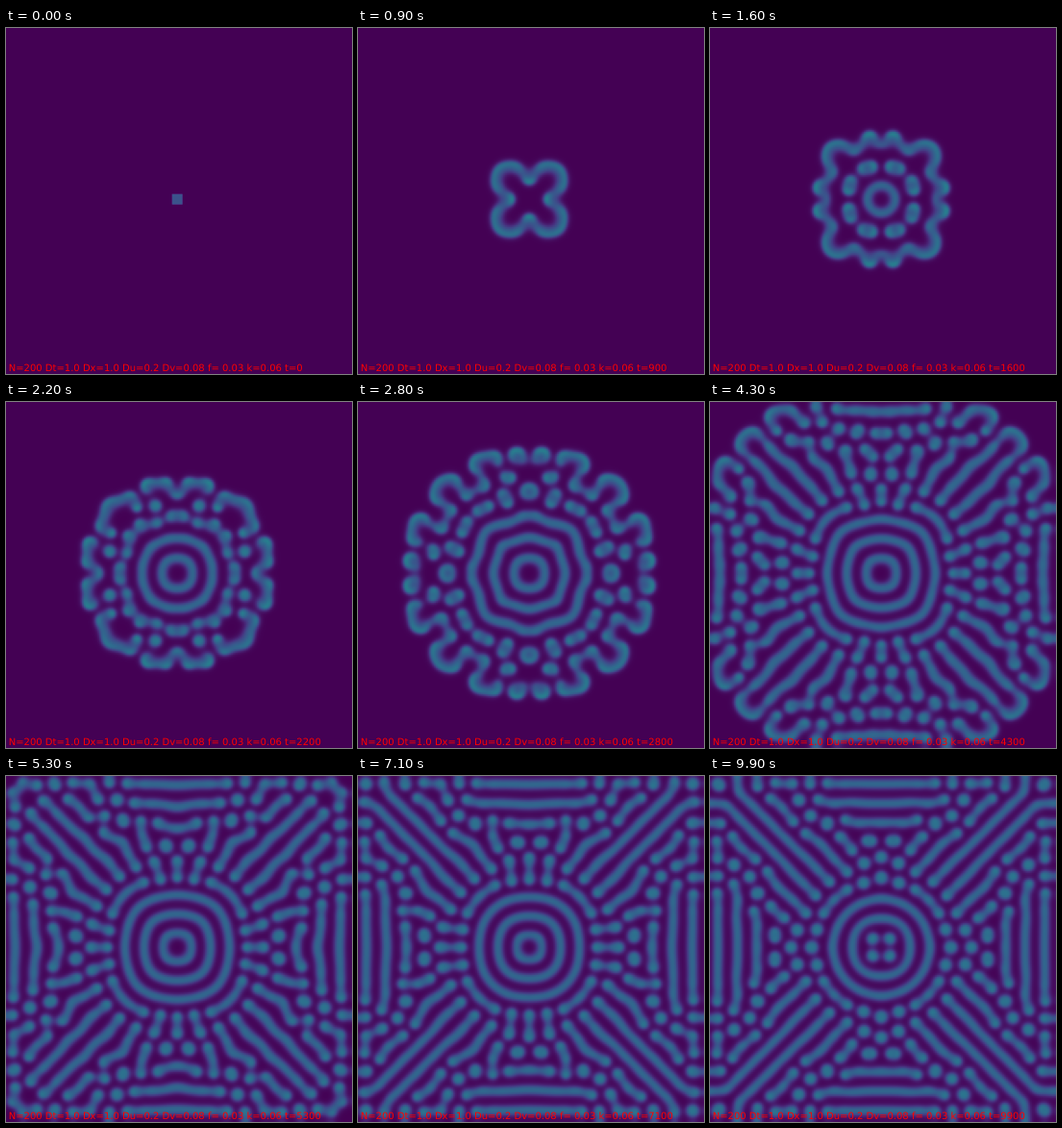
An HTML page with a canvas for the animation above (10 s loop, 360 by 360 pixels).

```html
<!DOCTYPE html>
<html lang="en">
<head>
<meta charset="utf-8">
<title>Gray-Scott reaction-diffusion</title>
<style>
  html, body { margin: 0; width: 100%; height: 100%; overflow: hidden; background: #440154; }
  canvas, svg { position: absolute; left: 0; top: 0; width: 360px; height: 360px; }
  text { font: 10px "DejaVu Sans", sans-serif; fill: #f00; text-rendering: geometricPrecision; white-space: pre; }
</style>
</head>
<body>
<canvas id="field" width="360" height="360"></canvas>
<svg viewBox="0 0 360 360"><text id="label" x="2.7" y="357"></text></svg>
<script>
const SIZE = 360, N = 200, CENTER = 99, HALF = N / 2, W = HALF + 2;
const Du = 0.2, Dv = 0.08, F = 0.03, K = 0.06;
const FRAMES = 100, FRAME_MS = 100, STEPS = 100;
const LAG = 90; // steps the seed rests before it starts to react

// The periodic field is mirror symmetric, so one quadrant with ghost cells is enough.
const grid = (outside, inside) => {
  const g = new Float64Array(W * W).fill(outside);
  for (let i = 0; i <= 3; i++) for (let j = 0; j <= 3; j++) g[i * W + j] = inside;
  return g;
};
let u = grid(1, 0.5), v = grid(0, 0.25);
let nextU = u.slice(), nextV = v.slice();

function mirrorEdges(g) {
  for (let i = 1; i <= HALF; i++) {
    g[i] = g[i * W] = g[W + i];
    g[(HALF + 1) * W + i] = g[i * W + HALF + 1] = g[HALF * W + i];
  }
}

function step(u, v, outU, outV) {
  for (let i = 1; i <= HALF; i++) {
    // Symmetric about the diagonal: compute one side, write both.
    for (let j = 1; j <= i; j++) {
      const c = i * W + j, m = j * W + i;
      const a = u[c], b = v[c], abb = a * b * b;
      const lapU = u[c - W] + u[c - 1] + u[c + 1] + u[c + W] - 4 * a;
      const lapV = v[c - W] + v[c - 1] + v[c + 1] + v[c + W] - 4 * b;
      outU[c] = outU[m] = a + Du * lapU - abb + F * (1 - a);
      outV[c] = outV[m] = b + Dv * lapV + abb - (F + K) * b;
    }
  }
  mirrorEdges(outU);
  mirrorEdges(outV);
}

const snapshots = [Float32Array.from(v)];
let stepsDone = 0;
function fieldAt(frame) {
  while (snapshots.length <= frame) {
    for (const end = snapshots.length * STEPS - LAG; stepsDone < end; stepsDone++) {
      step(u, v, nextU, nextV);
      [u, nextU] = [nextU, u];
      [v, nextV] = [nextV, v];
    }
    snapshots.push(Float32Array.from(v));
  }
  return snapshots[frame];
}

// Lower half of viridis, one stop per 0.05.
const stops = [
  [68, 1, 84], [71, 19, 101], [72, 36, 117], [70, 52, 128], [65, 68, 135], [59, 82, 139],
  [52, 96, 141], [47, 108, 142], [42, 120, 142], [37, 132, 142], [33, 145, 140]
];
const LEVELS = 512;
const palette = Uint32Array.from({ length: LEVELS }, (_, i) => {
  const p = i / (LEVELS - 1) * (stops.length - 1);
  const k = Math.min(Math.floor(p), stops.length - 2);
  const [r, g, b] = stops[k].map((c, n) => Math.round(c + (stops[k + 1][n] - c) * (p - k)));
  return (255 << 24 | b << 16 | g << 8 | r) >>> 0;
});

// Hanning interpolation taps from cells to pixels, the same on both axes.
const fold = cell => {
  const c = Math.max(0, Math.min(N - 1, cell));
  return 1 + (c < CENTER ? CENTER - 1 - c : Math.min(c - CENTER, HALF - 1));
};
const taps = Array.from({ length: SIZE }, (_, p) => {
  const x = (p + 0.5) * N / SIZE - 0.5, cell = Math.floor(x);
  return { lo: fold(cell), hi: fold(cell + 1), w: 0.5 - 0.5 * Math.cos(Math.PI * (x - cell)) };
});

const ctx = document.getElementById("field").getContext("2d");
const label = document.getElementById("label");
const image = ctx.createImageData(SIZE, SIZE);
const pixels = new Uint32Array(image.data.buffer);
const row = new Float32Array(W);

function draw(frame) {
  const field = fieldAt(frame);
  for (let y = 0; y < SIZE; y++) {
    const ty = taps[y], top = ty.lo * W, bottom = ty.hi * W;
    for (let i = 1; i <= HALF; i++) {
      row[i] = field[top + i] + (field[bottom + i] - field[top + i]) * ty.w;
    }
    for (let x = 0; x < SIZE; x++) {
      const t = taps[x], value = row[t.lo] + (row[t.hi] - row[t.lo]) * t.w;
      const level = Math.round(value * 2 * (LEVELS - 1));
      pixels[y * SIZE + x] = palette[Math.max(0, Math.min(LEVELS - 1, level))];
    }
  }
  ctx.putImageData(image, 0, 0);
  label.textContent =
    `N=${N} Dt=1.0 Dx=1.0 Du=${Du} Dv=${Dv} f= ${F} k=${K} t=${frame * STEPS}`;
}

const start = performance.now();
let shown = -1;
function update() {
  const frame = Math.floor((performance.now() - start) / FRAME_MS) % FRAMES;
  if (frame !== shown) draw(shown = frame);
  requestAnimationFrame(update);
}
update();
</script>
</body>
</html>
```
